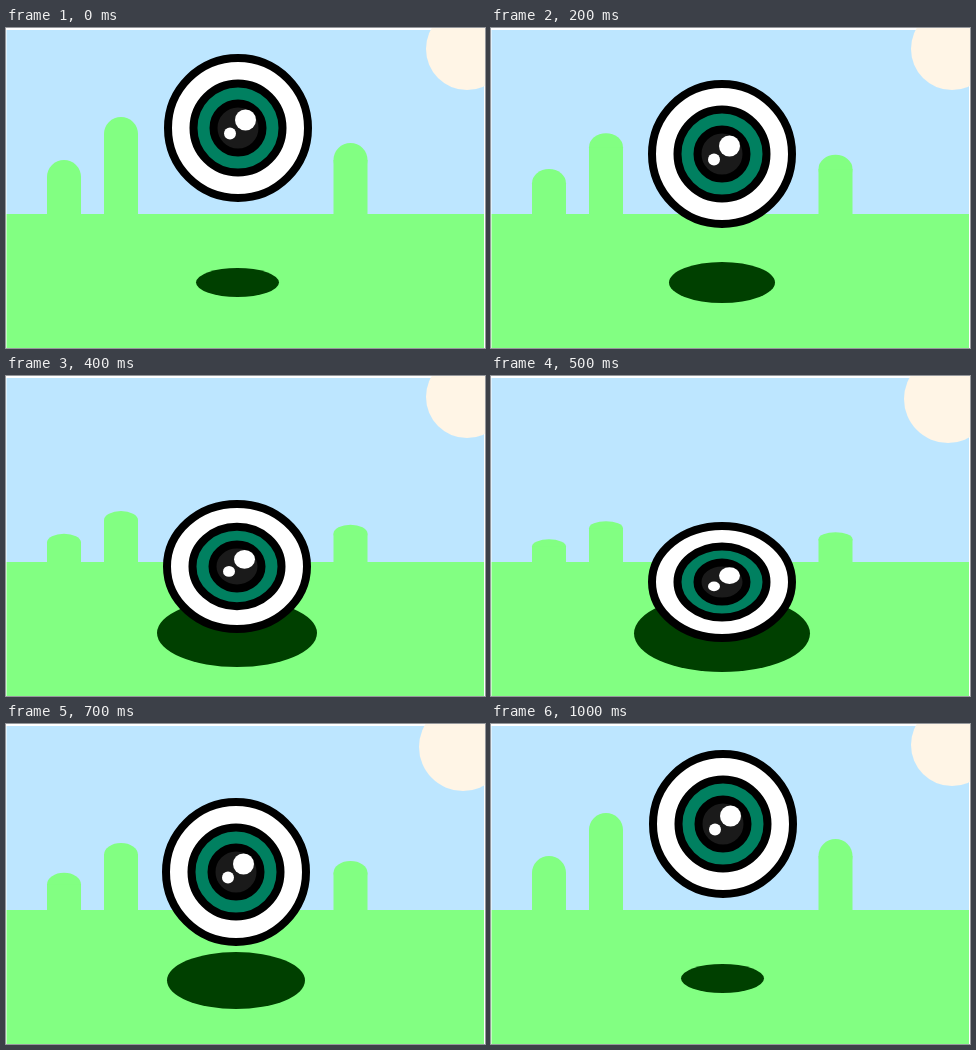
Write an HTML page with a canvas that moves like this. It is 479 by 320 pixels and loops after 1.1 s.

```html
<!DOCTYPE html>
<html lang="en">
<head>
<meta charset="utf-8">
<title>Bouncing eye</title>
<style>
  html, body { margin: 0; width: 100%; height: 100%; overflow: hidden; background: #fff; }
  canvas { display: block; }
</style>
</head>
<body>
<canvas id="stage" width="479" height="320"></canvas>
<script>
const ctx = document.getElementById('stage').getContext('2d');
const STEP = 100, STEPS = 11, HORIZON = 186;

// Key poses of the fall, from the top to the deepest squash
const poses = [
  { x: 232,   y: 100,   squash: 1,    hill: 1,    shadow: [231.5, 254.5, 41.5, 14.5] },
  { x: 231.5, y: 111,   squash: 1,    hill: .93,  shadow: [231.5, 254.5, 46, 17] },
  { x: 231,   y: 126,   squash: 1,    hill: .833, shadow: [231, 254.5, 53, 20.5] },
  { x: 230,   y: 148,   squash: 1,    hill: .69,  shadow: [230, 256.5, 69, 28.5] },
  { x: 231,   y: 190.5, squash: .893, hill: .525, shadow: [231, 257, 80, 34] },
  { x: 231,   y: 206,   squash: .8,   hill: .42,  shadow: [231, 257.5, 88, 38.5] }
];
const hills = [[41, 54], [98, 97], [327.5, 71]];

function ellipse(x, y, rx, ry, fill, outlined) {
  ctx.beginPath();
  ctx.ellipse(x, y, rx, ry, 0, 0, 2 * Math.PI);
  ctx.fillStyle = fill;
  ctx.fill();
  if (outlined) ctx.stroke();
}

function rect(x, y, w, h, fill) {
  ctx.fillStyle = fill;
  ctx.fillRect(x, y, w, h);
}

function drawHill(x, height, scale) {
  const r = 17, top = HORIZON - height * scale, ry = r * scale;
  ellipse(x + r, top + ry, r, ry, '#82ff82');
  rect(x, top + ry, 2 * r, HORIZON - top - ry, '#82ff82');
}

function drawEye({ x, y, squash }) {
  const disc = (dx, dy, r, fill, outlined) =>
    ellipse(x + dx, y + dy * squash, r, r * squash, fill, outlined);
  ctx.strokeStyle = '#000';
  ctx.lineWidth = 8;
  disc(0, 0, 70, '#fff', true);
  disc(0, 0, 44.5, '#008060', true);
  disc(0, 0, 24.5, '#1a1a1a', true);
  disc(7.5, -8, 10.5, '#fff');
  disc(-8, 5.5, 6, '#fff');
}

function draw(now) {
  const step = Math.floor(now / STEP) % STEPS;
  const pose = poses[Math.min(step, STEPS - 1 - step)];
  rect(0, 0, 479, 320, '#fff');
  rect(.5, 2, 477.5, HORIZON - 2, '#bde6ff');
  if (step % 2) ellipse(457, 23, 44, 44, '#fff5e6');
  else ellipse(461, 21, 41, 41, '#fff5e6');
  rect(.5, HORIZON, 477.5, 320 - HORIZON, '#82ff82');
  for (const [x, height] of hills) drawHill(x, height, pose.hill);
  ellipse(...pose.shadow, '#004000');
  drawEye(pose);
}

const start = performance.now();
function tick() {
  draw(performance.now() - start);
  requestAnimationFrame(tick);
}
tick();
</script>
</body>
</html>
```
